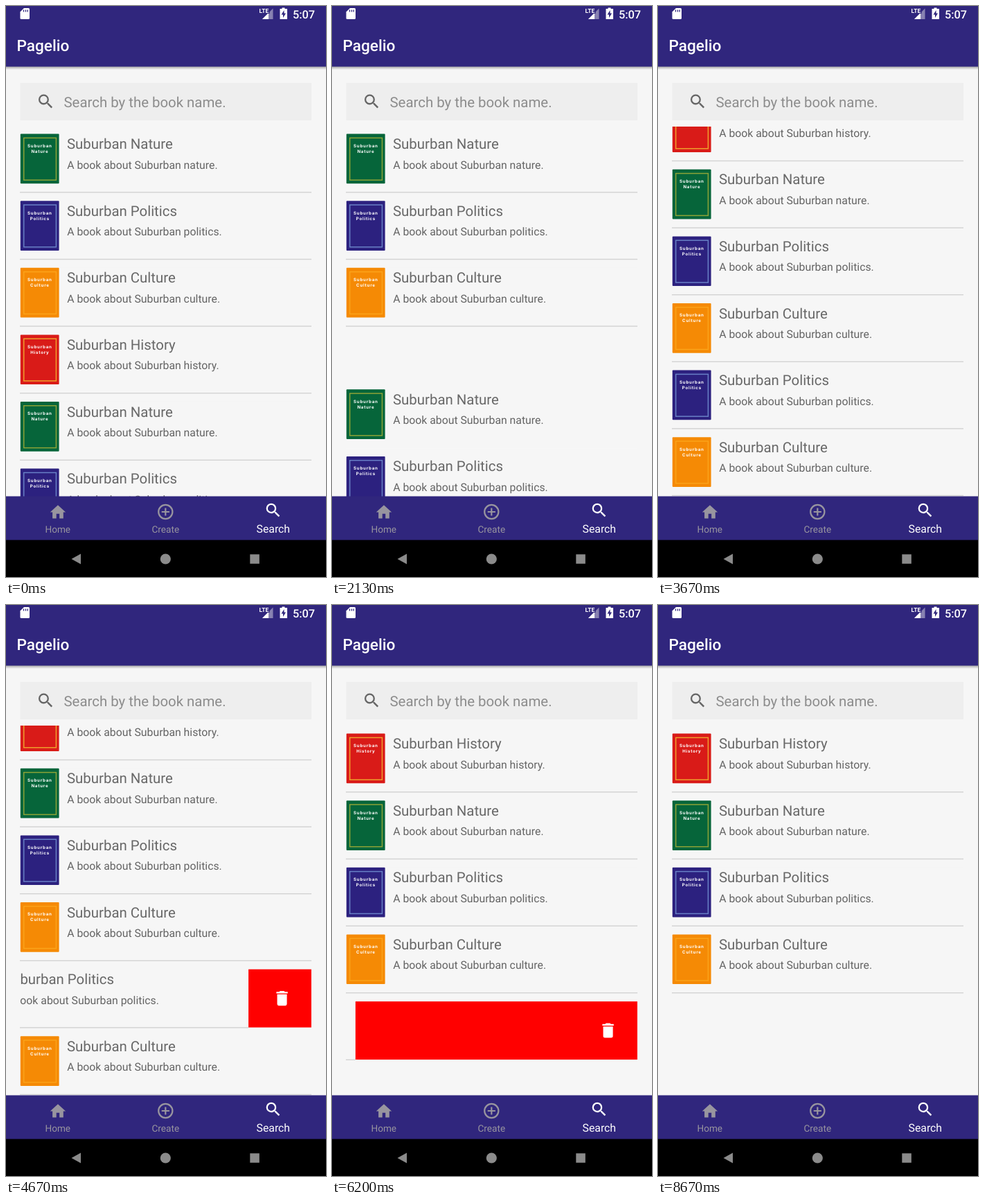
An HTML page for the animation above (8.74 s loop, 462x824 px).

```html
<!DOCTYPE html>
<html lang="en">
<head>
<meta charset="utf-8">
<title>Book list</title>
<style>
  html, body { margin: 0; width: 100%; height: 100%; overflow: hidden; background: #f6f6f6; }
  svg { display: block; width: 462px; height: 824px; font-family: Roboto, sans-serif; text-rendering: geometricPrecision; }
  .title { font-size: 20.4px; fill: #686868; }
  .about { font-size: 15.8px; fill: #646464; }
  .cover { font: 700 6.2px Inter, sans-serif; letter-spacing: .75px; fill: #fff; text-anchor: middle; }
  .tab { font-size: 13.6px; fill: #98959f; text-anchor: middle; }
</style>
</head>
<body>
<svg viewBox="0 0 462 824">
  <defs>
    <clipPath id="listClip"><rect x="20" y="174" width="421" height="534"/></clipPath>
    <linearGradient id="shadow" x2="0" y2="1">
      <stop stop-color="#000" stop-opacity=".34"/>
      <stop offset="1" stop-color="#000" stop-opacity="0"/>
    </linearGradient>
    <path id="lens" d="M15.5 14h-.79l-.28-.27A6.47 6.47 0 0 0 16 9.5 6.5 6.5 0 1 0 9.5 16c1.61 0 3.09-.59 4.23-1.57l.27.28v.79l5 4.99L20.49 19zM9.5 14a4.5 4.5 0 1 1 0-9 4.5 4.5 0 0 1 0 9z"/>
    <path id="trash" d="M6 19a2 2 0 0 0 2 2h8a2 2 0 0 0 2-2V7H6zM19 4h-3.5l-1-1h-5l-1 1H5v2h14z"/>
  </defs>
  <rect width="462" height="824" fill="#f6f6f6"/>

  <rect x="20.5" y="111" width="420.5" height="54" fill="#eee"/>
  <use href="#lens" transform="translate(43.5 124) scale(1.15)" fill="#666"/>
  <text x="83.5" y="145.8" font-size="20.4" fill="#8c8c8c">Search by the book name.</text>

  <g id="list" clip-path="url(#listClip)"></g>

  <!-- status bar and header -->
  <rect y="87" width="462" height="5" fill="url(#shadow)"/>
  <rect width="462" height="87.5" fill="#30267d"/>
  <path d="M26 3h6.5q1.5 0 1.5 1.5v13q0 1.5-1.5 1.5h-10.5q-1.5 0-1.5-1.5v-9z" fill="#fff"/>
  <path d="M25.5 5.5v3M28.5 5.5v3M31.3 5.5v3" stroke="#30267d" stroke-width="1.3"/>
  <path d="M385.5 3.5v15.5h-15.5z" fill="#8781b1"/>
  <path d="M379 10v9h-9z" fill="#fff"/>
  <rect x="365" y="2" width="15.5" height="9" fill="#30267d"/>
  <text x="365.5" y="10" font-size="8.5" font-weight="700" fill="#fff">LTE</text>
  <path d="M398.5 2.5h4v1.6h3.5v15h-10.5v-15h3z" fill="#fff"/>
  <path d="M401.5 6l-4 6.5h2.5v4.5l4-6.5h-2.5z" fill="#30267d"/>
  <text x="414" y="17.6" font-size="16.3" font-weight="500" fill="#fff">5:07</text>
  <text x="15.5" y="65" font-size="22.6" font-weight="500" fill="#fff">Pagelio</text>

  <!-- tabs -->
  <rect y="707.5" width="462" height="64" fill="#30267d"/>
  <path transform="translate(61.5 717) scale(1.12)" fill="#98959f" d="M10 20v-6h4v6h5v-8h3L12 3 2 12h3v8z"/>
  <g fill="none" stroke="#98959f" stroke-width="2.2">
    <circle cx="230.3" cy="730" r="10.1"/>
    <path d="M230.3 724.4v11.2M224.7 730h11.2"/>
  </g>
  <use href="#lens" transform="translate(372.3 714.3) scale(1.12)" fill="#fff"/>
  <text class="tab" x="74.8" y="759.7">Home</text>
  <text class="tab" x="230.3" y="759.7">Create</text>
  <text x="385.8" y="760" font-size="15.8" fill="#fff" text-anchor="middle">Search</text>

  <!-- system navigation -->
  <rect y="770.6" width="462" height="53.4" fill="#000"/>
  <g fill="#8b8b8b">
    <path d="M94.5 798l13.5-7.5v15z"/>
    <circle cx="230.3" cy="798" r="7.6"/>
    <rect x="352.3" y="791.3" width="13.5" height="13.5"/>
  </g>
</svg>
<script>
const LOOP = 8740, ROW = 96.6, TOP = 174, VIEW = 533.2, START_SCROLL = 97.6;
const SWIPE_TIME = 450, COLLAPSE_TIME = 300, WIDTH = 421;

// Cover and frame colours by topic.
const BOOKS = {
  History: ['#d91b18', '#efa02d'],
  Nature: ['#06653a', '#8da337'],
  Politics: ['#2c217f', '#6880c6'],
  Culture: ['#f58a05', '#fba31a'],
};
const topics = [...Object.keys(BOOKS), ...Object.keys(BOOKS)];

// Row index -> when its swipe starts and when it is removed.
const removals = {
  4: { swipe: 1570, remove: 2049 },
  5: { swipe: 2600, remove: 3120 },
  6: { swipe: 4536, remove: 5010 },
  7: { swipe: 5800, remove: 6280 },
};

const list = document.getElementById('list');
list.innerHTML = topics.map(topic => {
  const [fill, frame] = BOOKS[topic];
  return `<g>
    <g class="action">
      <rect x="20.4" y="11.7" width="420.4" height="83.9" fill="#f00"/>
      <use href="#trash" transform="translate(384.5 39.6) scale(1.17)" fill="#fff"/>
    </g>
    <g class="content">
      <rect x="20" y="11" width="${WIDTH}" height="85.6" fill="#f6f6f6"/>
      <rect x="20.8" y="11.6" width="55.8" height="71.7" rx="1" fill="${fill}"/>
      <rect x="25.7" y="17.4" width="46.7" height="60.8" fill="none" stroke="${frame}" stroke-width="1.5"/>
      <text class="cover" x="48.9" y="31">Suburban</text>
      <text class="cover" x="48.9" y="39">${topic}</text>
      <text class="title" x="88" y="33.2">Suburban ${topic}</text>
      <text class="about" x="88.2" y="61.6">A book about Suburban ${topic.toLowerCase()}.</text>
      <rect class="divider" x="20" y="95.2" width="${WIDTH}" height="1.4" fill="#d3d3d3"/>
    </g>
  </g>`;
}).join('');

const rows = [...list.children].map(group => ({
  group,
  action: group.querySelector('.action'),
  content: group.querySelector('.content'),
  divider: group.querySelector('.divider'),
}));

function ease(time, start, duration) {
  const x = Math.min(1, Math.max(0, (time - start) / duration));
  return x * x * (3 - 2 * x);
}

const show = (element, visible) => element.setAttribute('display', visible ? 'inline' : 'none');

function draw(time) {
  const states = rows.map((row, i) => {
    const removal = removals[i];
    if (!removal) return { swipe: 0, collapse: 0, removed: false };
    return {
      swipe: ease(time, removal.swipe, SWIPE_TIME),
      collapse: ease(time, removal.remove, COLLAPSE_TIME),
      removed: time >= removal.remove,
    };
  });
  const height = states.reduce((sum, s) => sum + ROW * (1 - s.collapse), 0);
  const scroll = Math.max(0, Math.min(START_SCROLL, height - VIEW));

  let y = TOP - scroll;
  let sliding = false;
  rows.forEach((row, i) => {
    const { swipe, collapse, removed } = states[i];
    row.group.setAttribute('transform', `translate(0 ${y})`);
    row.content.setAttribute('transform', `translate(${-WIDTH * swipe} 0)`);
    show(row.group, !removed);
    show(row.action, swipe > 0);
    show(row.divider, !sliding);
    y += ROW * (1 - collapse);
    sliding ||= collapse > 0 && collapse < 1;
  });
}

function tick() {
  draw(performance.now() % LOOP);
  requestAnimationFrame(tick);
}
tick();
</script>
</body>
</html>
```
